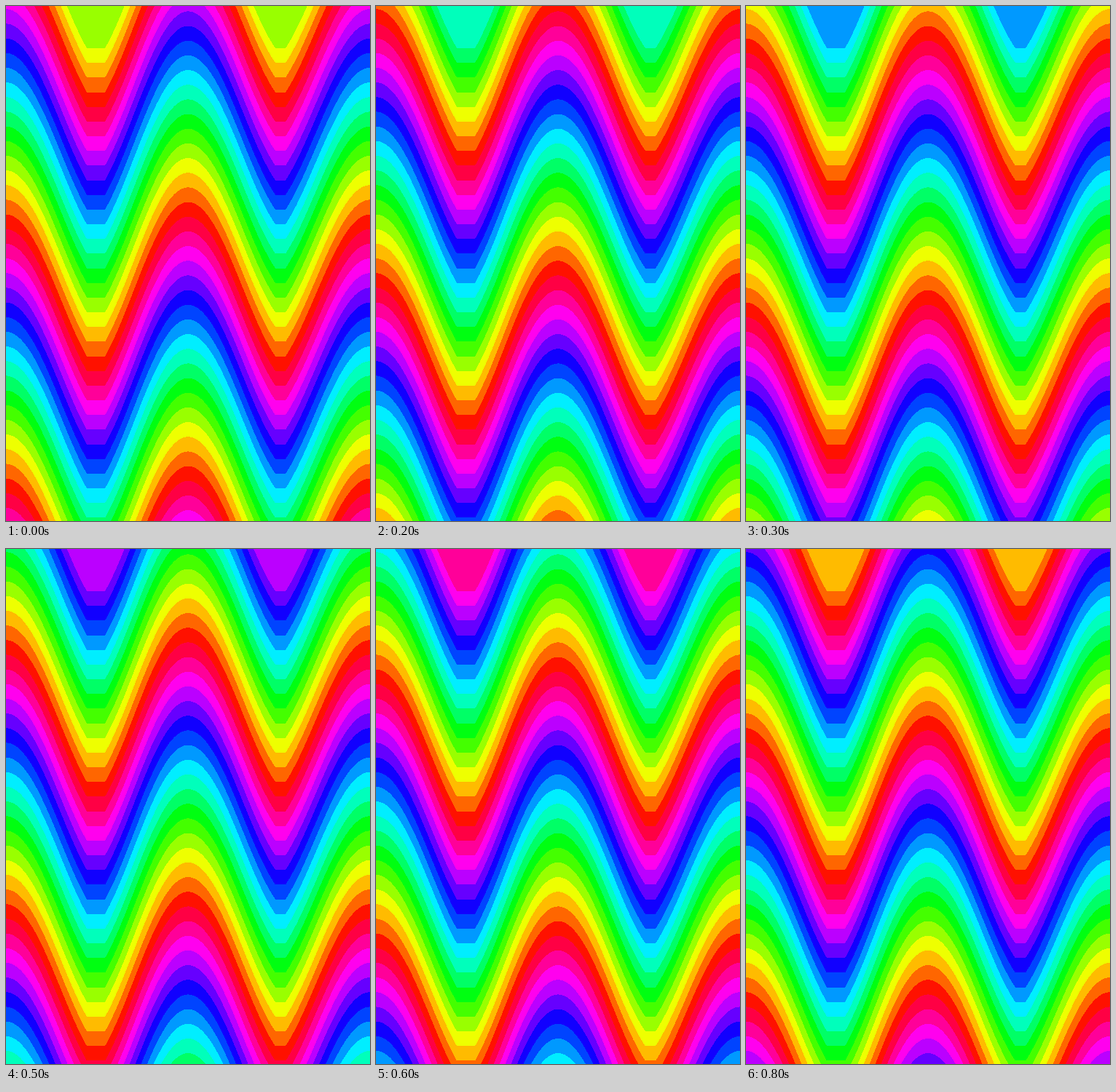
An HTML page for the animation above (900 ms loop, 500 by 708 pixels).

```html
<!DOCTYPE html>
<html lang="en">
<head>
<meta charset="utf-8">
<title>Rainbow waves</title>
<style>
  html, body { margin: 0; width: 100%; height: 100%; overflow: hidden; }
  svg { display: block; width: 100%; height: 100%; }
</style>
</head>
<body>
<svg id="stage" viewBox="0 0 500 708" shape-rendering="crispEdges"></svg>
<script>
const W = 500, H = 708;
const BAND = 20.17, TOP = -154, COUNT = 43;
const STEP_MS = 100, STEPS = 9;
const FLOOR = 212;   // depth of the flat troughs
const REACH = 150;   // half period of the slope's cosine

// Slopes run from a rounded crest down to the corner of a flat trough
const slopes = [
  { crest: 0, top: 17, corner: 111 },
  { crest: 250, top: 0, corner: 136 },
  { crest: 250, top: 0, corner: 370 },
  { crest: 500, top: 17, corner: 384 },
];

const drop = dx => 1 - Math.cos(Math.PI * dx / REACH);

function waveY(x) {
  const slope = slopes.find(({ crest, corner }) =>
    x >= Math.min(crest, corner) && x <= Math.max(crest, corner));
  if (!slope) return FLOOR;
  const { crest, top, corner } = slope;
  return top + (FLOOR - top) * drop(x - crest) / drop(corner - crest);
}

const stage = document.getElementById('stage');

function addPath(d) {
  const path = document.createElementNS('http://www.w3.org/2000/svg', 'path');
  path.setAttribute('d', d);
  return stage.appendChild(path);
}

const bands = [addPath(`M0 0H${W}V${H}H0Z`)];
for (let i = 0; i < COUNT; i++) {
  let d = `M0 ${H + FLOOR}`;
  for (let x = 0; x <= W; x++) {
    d += `L${x} ${(TOP + i * BAND + waveY(x)).toFixed(2)}`;
  }
  bands.push(addPath(`${d}V${H + FLOOR}Z`));
}

let shown = -1;
function draw(ms) {
  const step = Math.floor(ms / STEP_MS) % STEPS;
  if (step === shown) return;
  shown = step;
  bands.forEach((band, i) => {
    const hue = (84 + 40 * step - 20 * i + 1080) % 360;
    band.setAttribute('fill', `hsl(${hue}, 100%, 50%)`);
  });
}

const start = performance.now();
function tick() {
  draw(performance.now() - start);
  requestAnimationFrame(tick);
}
draw(0);
requestAnimationFrame(tick);
</script>
</body>
</html>
```
